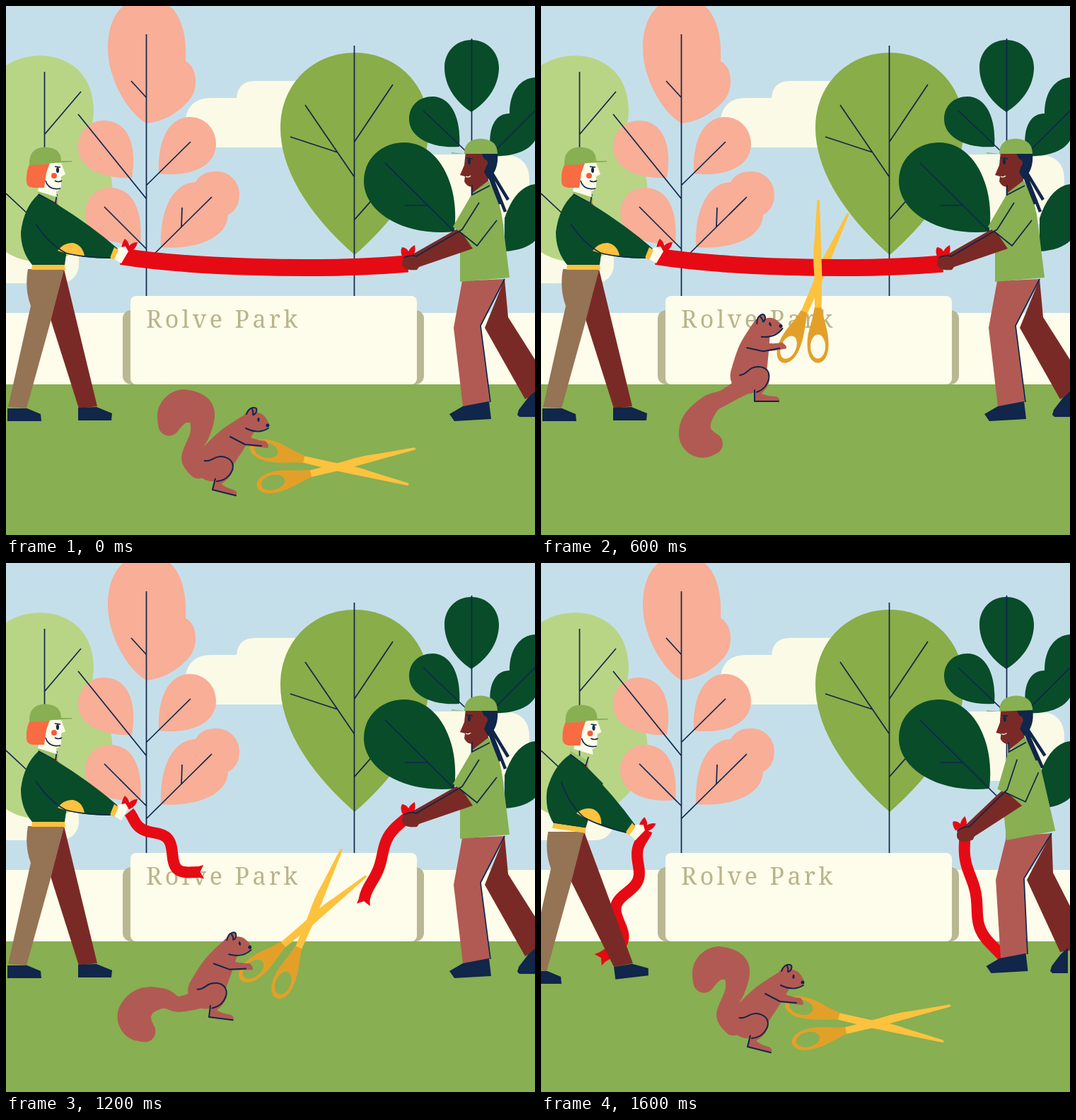
Animation of 748x748 px, one loop 1.7 s. Source, as an HTML page:

```html
<!DOCTYPE html>
<html lang="en">
<head>
<meta charset="utf-8">
<title>Park opening</title>
<style>
html, body { margin: 0; width: 100%; height: 100%; overflow: hidden; }
svg { display: block; width: 100vw; height: 100vh; }
.line { fill: none; stroke: #10264a; stroke-width: 1.7; }
.ink { fill: none; stroke: #10264a; stroke-width: 2; stroke-linecap: round; stroke-linejoin: round; }
.braid { fill: none; stroke: #10264a; stroke-width: 4.5; }
.navy { fill: #10264a; }
.cream { fill: #fefcea; }
.dark { fill: #084c2a; }
.grass { fill: #88af52; }
.pink { fill: #f8ae97; }
.red { fill: #e60a14; }
.gold { fill: #fdc23e; }
.skin { fill: #7a2a26; }
.fur { fill: #b15a53; }
text { font: 34px "Noto Serif", serif; letter-spacing: 4.4px; fill: #b9b48d; }
</style>
</head>
<body>
<svg viewBox="0 0 748 748">
  <defs>
    <g id="half">
      <path class="gold" d="M-52-4.5L0-5.5Q25-8 50-5L103-1.5Q106 1 103 2L0 5.5-52 5Z"/>
      <path fill="#e3a029" fill-rule="evenodd" d="M-48-5C-70-8-80-15-100-15C-135-15-135 15-100 15C-80 15-65 8-48 5ZM-120 0a17 10.5 0 1 0 34 0a17 10.5 0 1 0-34 0Z"/>
    </g>
  </defs>

  <rect width="748" height="748" fill="#c5dfea"/>
  <g fill="#fbfae6">
    <path d="M253 200V167Q255 130 290 130H326Q328 106 352 106H480V200Z"/>
    <path d="M590 308V210H705Q740 212 740 246V308Z"/>
    <rect x="-40" y="325" width="143" height="67" rx="26"/>
  </g>
  <rect class="cream" y="434" width="748" height="102"/>
  <rect class="grass" y="535" width="748" height="213"/>

  <path fill="#b8d586" d="M-20 105C10 53 118 55 123.500 140C126 165 116 180 120 195C150 215 156 260 146 290C130 330 90 362 50 362C20 362 0 350-10 340Z"/>
  <path class="line" d="M54.500 93V300M55 181L106 121M0 265L32 295"/>

  <path class="pink" d="M199 166C175 154 144 105 144 60C144 10 170-12 199-12C235-12 257 20 254 78C270 86 273 115 260 132C245 150 225 163 199 166Z
    M178 243C150 245 102 235 102 200C102 178 118 162 138 162C172 162 186 195 178 243Z
    M216 237C214 190 230 157 260 157C282 157 297 175 297 195C297 230 255 242 216 237Z
    M190 335C150 340 112 325 112 293C112 272 128 257 147 257C180 257 194 290 190 335Z
    M219 341C217 290 235 250 268 249C275 237 285 234 297 234C318 234 330 250 330 267C330 282 322 292 314 295C313 330 265 345 219 341Z"/>
  <path class="line" d="M198.500 40V411M177 106L198 129M102 153L198 272M261 192L198 254M139 284L198 343M291 270L198 362M249 285L248 313"/>

  <path fill="#89ad48" d="M493 352C440 306 388 240 388 172C388 110 435 66 493 66C551 66 598 110 598 172C598 240 546 306 493 352Z"/>
  <path class="line" d="M492.500 56V411M402 185L469 207M423 140L492 241M547 111L492 193M492 303L522 269"/>

  <path class="dark" d="M658 150C635 135 620 112 620 87C620 65 636 48 658 48C680 48 697 65 697 87C697 112 682 135 658 150Z
    M641 199C600 202 570 185 570 160C570 140 585 128 603 128C630 128 644 160 641 199Z
    M634 319C560 326 506 290 506 248C506 215 532 193 563 193C610 193 642 250 634 319Z
    M686 212C680 175 690 152 712 152C712 120 728 102 748 101V190C740 205 715 214 686 212Z
    M748 252C730 254 715 270 705 300V347C725 346 740 340 748 332Z"/>
  <path class="line" d="M658.500 46V411M590 148L650 205M536 222L652 337M564 282H596M748 148L688 208"/>

  <rect x="165" y="430" width="426" height="105" rx="12" fill="#bab793"/>
  <rect class="cream" x="176" y="410" width="405" height="125" rx="8"/>
  <text x="198" y="455">Rolve Park</text>

  <use id="halfA" href="#half"/>
  <path id="ribbon" fill="none" stroke="#e60a14" stroke-width="24" d="M163 354C250 368 430 376 568 364.500"/>
  <path id="ribbonL" class="red"/>
  <path id="ribbonR" class="red"/>
  <use id="halfB" href="#half"/>

  <g id="man">
    <path id="manRear" class="skin"/>
    <path id="manBoot" class="navy" d="M102 568L128 567 150 576 149 586 102 586Z"/>
    <g id="manLeg">
      <path fill="#957355" d="M31 372H82L62 450 29 569 3 567 35 424Q26 400 31 372Z"/>
      <path class="navy" d="M2 569H30L49 577 50 587H2Z"/>
    </g>
    <g id="manBody">
      <path fill="#9cc46b" d="M45 261L74 272 72 285 45 275Z"/>
      <path fill="#f45c3a" d="M70 274L75 283 68 282Z"/>
      <path class="dark" d="M46 266Q25 285 21 320Q21 347 37 366H83L86 345 98 300 70 279Z"/>
      <path class="gold" d="M37 366H83L84 373H36Z"/>
      <path class="line" d="M46 266L70 279 72 266"/>
      <g id="manArm">
        <path class="red" d="M163 347Q163 336 168 329Q174 334 174 339Q179 334 186 334Q184 344 175 348Z"/>
        <path class="cream" d="M153 343L169 340 173 347 163 364 152 357Z"/>
        <path class="dark" d="M55 271L70 279Q120 310 158 343L148 357Q108 357 80 348Q55 330 42 308Z"/>
        <path class="gold" d="M73 346Q82 334 95 335Q108 338 111 353Q92 353 73 346ZM147 356L153 341 159 345 153 359Z"/>
        <path class="line" d="M42 308Q60 336 84 349Q108 356 148 356"/>
      </g>
    </g>
    <g id="manHead">
      <path class="cream" d="M53 222H78L84 238 78 241V255Q75 262 71 262L72 270 45 262Z"/>
      <path fill="#f96b42" d="M35 221Q28 232 29 248Q29 256 38 257H54L57 236 62 222Z"/>
      <path class="grass" d="M33 225Q32 200 55 199.500Q78 200 78 219L93 219V220.500Q65 221 56 224Z"/>
      <circle cx="68" cy="240" r="4" fill="#f45c3a"/>
      <ellipse class="navy" cx="73" cy="232" rx="2" ry="4"/>
      <path class="line" d="M56 247Q60 261 77 258M69 247Q74 250 79 247M69 227L77 228"/>
    </g>
  </g>

  <g id="woman">
    <path id="womanRear" class="skin"/>
    <path id="womanRearBoot" class="navy" d="M723 578L725 571 738 554 748 545V581H726Z"/>
    <path id="womanLeg" class="fur"/>
    <path id="womanSeam" class="line"/>
    <path id="womanBoot" class="navy" d="M627 577L646 566 683 559 686 584 634 587Z"/>
    <g id="womanBody">
      <path class="grass" d="M659 265L682 246Q700 275 703 310L712 384 642 390V335L650 300Z"/>
      <g id="womanArm">
        <path class="red" d="M560 354Q557 346 560 341Q567 342 569 347Q572 341 578 338Q580 348 575 355Z"/>
        <path class="skin" d="M640 314L575 351Q560 353 560 365Q562 375 581 373L584 369 660 343Z"/>
        <path class="grass" d="M661 262L632 312 666 339 690 303 682 262Z"/>
        <path class="line" d="M669 278L645 316Q638 320 580 354Q572 351 562 356M640 318L666 339 694 303"/>
      </g>
    </g>
    <g id="womanHead">
      <path class="skin" d="M650 206H678L682 247 660 264 659 256Q651 255 648 248L649 241 642 239 648 225Z"/>
      <path class="navy" d="M672 208H695Q697 233 682 245L676 235 680 224Z"/>
      <path class="braid" d="M683 239L699 280M685 238L706 291M687 236L710 274"/>
      <circle class="skin" cx="675" cy="222" r="6"/>
      <path class="grass" d="M648 209Q648 188 672 187.500Q695 189 695 209L650 209 630 208.500V207Z"/>
      <ellipse class="navy" cx="655" cy="220" rx="2" ry="4"/>
      <path class="line" d="M651 215L660 216M659 253V267L684 254"/>
      <path d="M650 241Q654 243 657 240" fill="none" stroke="#fefcea" stroke-width="1.300"/>
    </g>
  </g>

  <path id="tail" class="fur"/>
  <path id="torso" class="fur"/>
  <g id="leg">
    <path class="fur" d="M-21-37C-12-53 21-54 21-32C21-22 14-16 10-11Q18-7 30-7Q37-4 34 0H0V-14Z"/>
    <path class="ink" d="M-21-37C-10-37-10-49 6-49C21-48 25-35 15-21Q11-16 3-13M0-16V0H34"/>
  </g>
  <g id="arm">
    <path class="fur" d="M-36-22Q-18-8 2-7Q8 0 5 3L-4 2-27-1-48-13Z"/>
    <path class="ink" d="M-48-13L-27-2-4 0"/>
  </g>
  <g id="head">
    <path class="fur" d="M-24 4Q-22-8-17-10Q-13-18-5-17Q-1-15-4-10Q8-11 15 6Q14 16-2 15L-18 15Z"/>
    <path class="ink" d="M-17-8Q-14-16-8-17Q-1-18-3-11Q-5-7-8-7Q-7-12-9-15M-18 12Q0 21 14 12"/>
    <ellipse class="navy" rx="1.500" ry="3"/>
    <circle class="navy" cx="13" cy="8" r="2.500"/>
  </g>
</svg>
<script>
const { PI, min, max, sin, cos, sqrt, exp, hypot } = Math;
const $ = id => document.getElementById(id);
const set = (id, value, name = "transform") => $(id).setAttribute(name, value);
const mix = (a, b, k) => a + (b - a) * k;
const rad = deg => deg * PI / 180;
const turned = ([x, y], deg) =>
  [x * cos(rad(deg)) - y * sin(rad(deg)), x * sin(rad(deg)) + y * cos(rad(deg))];

// Smooth value of rows [position, ...values] at t.
function at(rows, t) {
  const i = max(1, rows.findIndex(row => row[0] >= t));
  const p = rows[i - 1], q = rows[i], o = rows[i - 2], r = rows[i + 1];
  const d = q[0] - p[0], u = (t - p[0]) / d;
  return q.slice(1).map((v, n) => {
    n++;
    const a = o ? (v - o[n]) / (q[0] - o[0]) * d : 0;
    const b = r ? (r[n] - p[n]) / (r[0] - p[0]) * d : 0;
    return mix(p[n], v, u * u * (3 - 2 * u)) + a * u * (1 - u) ** 2 - b * u * u * (1 - u);
  });
}

// A soft shape of varying width through points [x, y, width].
function limb(points) {
  const rows = points.map((p, i) => [i, ...p]);
  let d = "";
  for (let s = 0; s < points.length - 1; s += 1 / 16) {
    const [x, y, w] = at(rows, s), r = w / 2;
    d += `M${x - r} ${y}a${r} ${r} 0 1 0 ${w} 0a${r} ${r} 0 1 0 ${-w} 0`;
  }
  return d;
}

// A flat strip of even width with a forked end.
function band(points, width) {
  const left = [], right = [];
  let dx, dy;
  points.forEach(([x, y], i) => {
    const a = points[max(0, i - 1)], b = points[min(points.length - 1, i + 1)];
    const len = hypot(b[0] - a[0], b[1] - a[1]);
    dx = (b[0] - a[0]) / len; dy = (b[1] - a[1]) / len;
    left.push([x - dy * width / 2, y + dx * width / 2]);
    right.unshift([x + dy * width / 2, y - dx * width / 2]);
  });
  const [x, y] = points.at(-1);
  const fork = side => [x + dx * 7 - dy * side * width * .6, y + dy * 7 + dx * side * width * .6];
  return "M" + [...left, fork(1), [x + dx * 2, y + dy * 2], fork(-1), ...right].join("L") + "Z";
}

// Step, heel x, heel y, lift: 0 is crouching, 1 is upright.
const jump = [
  [0, 292, 684, 0], [4, 300, 583, .56], [6, 302, 559, 1], [10, 301, 579, .95],
  [12, 287, 642, .68], [14, 273, 668, .38], [16, 292, 684, 0]
];
// Distance from the heel, direction, width; the tip swings down with the lift.
const tail = [[35, 235, 26], [56, 234, 22], [83, 258, 28], [112, 261, 40], [125, 251, 47], [122, 243, 44], [110, 236, 30]];

function drawSquirrel(t) {
  const [x, y, lift] = at(jump, t);
  const stand = max(0, (lift - .36) / .64);
  const tilt = -22 * stand, lean = mix(14, 0, stand), aim = -78 * lift;
  const eye = [x + mix(65, 22, stand), y - mix(99, 109, stand)];
  const paw = [x + mix(73, 39, stand), y - mix(62, 76, stand)];
  const [hx, hy] = turned([-9, -36], lean);
  const hip = [x + hx, y + hy], neck = [eye[0] - 12, eye[1] + 3];
  const chest = [mix(neck[0], hip[0], .5) - 2, mix(neck[1], hip[1], .5)];

  set("torso", limb([[...neck, 25], [...chest, 43], [...hip, 51]]), "d");
  set("tail", limb(tail.map(([far, angle, width], i) => {
    const a = rad(angle - 101 * lift * sin(min(1, i / 3.3) * PI / 2)), r = far * (1 - .23 * lift);
    return [x + r * cos(a), y + r * sin(a), width];
  })), "d");
  set("leg", `translate(${x} ${y}) rotate(${lean})`);
  set("arm", `translate(${paw}) rotate(${tilt * .7})`);
  set("head", `translate(${eye}) rotate(${tilt})`);

  const [sx, sy] = turned([103, 30], aim);
  const gap = 13.5 - 10 * exp(-(((t - 8.3) / 1.7) ** 2));
  const grip = `translate(${paw[0] + sx} ${paw[1] + sy})`;
  set("halfA", `${grip} rotate(${aim + gap})`);
  set("halfB", `${grip} rotate(${aim - gap}) translate(10)`);
}

// Step, then direction and length of the left and the right piece.
const fall = [
  [7, 3, 215, 180, 180], [10, 5, 208, 167, 139], [12, 43, 130, 115, 135],
  [14, 91, 190, 95, 197], [16, 107, 190, 75, 192]
];

function wavy(x, y, angle, length, bow, wave, cycles) {
  return Array.from({ length: 60 }, (_, i) => {
    const s = i / 59;
    const side = bow * sin(PI * s) + wave * sqrt(s) * sin(2 * PI * cycles * s);
    const [dx, dy] = turned([s * length, side], angle);
    return [x + dx, y + dy];
  });
}

function drawRibbon(t, k) {
  const cut = t >= 8;
  set("ribbon", cut ? "none" : "inline", "display");
  set("ribbonL", "", "d");
  set("ribbonR", "", "d");
  if (!cut) return;
  const [la, ll, ra, rl] = at(fall, t);
  const loose = min(1, (t - 7) / 3), width = mix(24, 16, loose);
  const cycles = min(2.1, max(1, 1 + (t - 10) * .28));
  set("ribbonL", band(wavy(mix(174, 150, k), mix(352, 378, k), la, ll, 0, 14 * loose, cycles), width), "d");
  set("ribbonR", band(wavy(mix(570, 600, k), mix(357, 376, k), ra, rl, 14 * loose, 7 * loose, cycles * .8), width), "d");
}

// k runs from standing (0) to stepping away (1).
function drawPeople(k) {
  set("manBody", `translate(${-k} ${8 * k}) rotate(${8.5 * k} 68 240)`);
  set("manArm", `rotate(${5 * k} 58 275)`);
  set("manHead", `translate(${1.5 * k} ${k})`);
  set("manLeg", `translate(${-21 * k} ${8 * k})`);
  set("manRear", `M${82 - 21 * k} ${372 + 8 * k}L${129 + k} 566L103 ${569 + 2 * k}L${63 - 23 * k} ${443 + 2 * k}Z`, "d");
  set("manBoot", `translate(${2 * k} 0) rotate(${-7 * k} 126 577)`);

  set("womanBody", `rotate(${-6 * k} 670 235)`);
  set("womanArm", `rotate(${-8 * k} 668 280)`);
  set("womanHead", `rotate(${-2 * k} 670 200)`);
  const hip = `${705 + 17 * k} ${386 - 4 * k}`, knee = `${671 + 12 * k} ${452 - 6 * k}`, hem = `${685 + 3 * k} ${560 - 7 * k}`;
  set("womanLeg", `M${645 + 13 * k} ${389 - 2 * k}L${hip}L${knee}L${hem}L${646 + 4 * k} ${566 - 7 * k}L${633 + 10 * k} ${455 - 7 * k}Z`, "d");
  set("womanSeam", `M${hip}L${knee}L${hem}`, "d");
  set("womanRear", `M${hip}L${710 + 14 * k} ${440 - 2 * k}L748 ${500 - 15 * k}V548L734 ${556 - 6 * k}L${677 + 10 * k} ${455 - 7 * k}Z`, "d");
  set("womanBoot", `translate(${2.5 * k} ${-7 * k})`);
  set("womanRearBoot", `translate(${-3 * k} ${-k})`);
}

function frame() {
  const step = Math.floor(performance.now() % 1700 / 100);
  const away = max(0, (step - 14) / 2);
  drawSquirrel(step);
  drawRibbon(step, away);
  drawPeople(away);
  requestAnimationFrame(frame);
}
frame();
</script>
</body>
</html>
```
